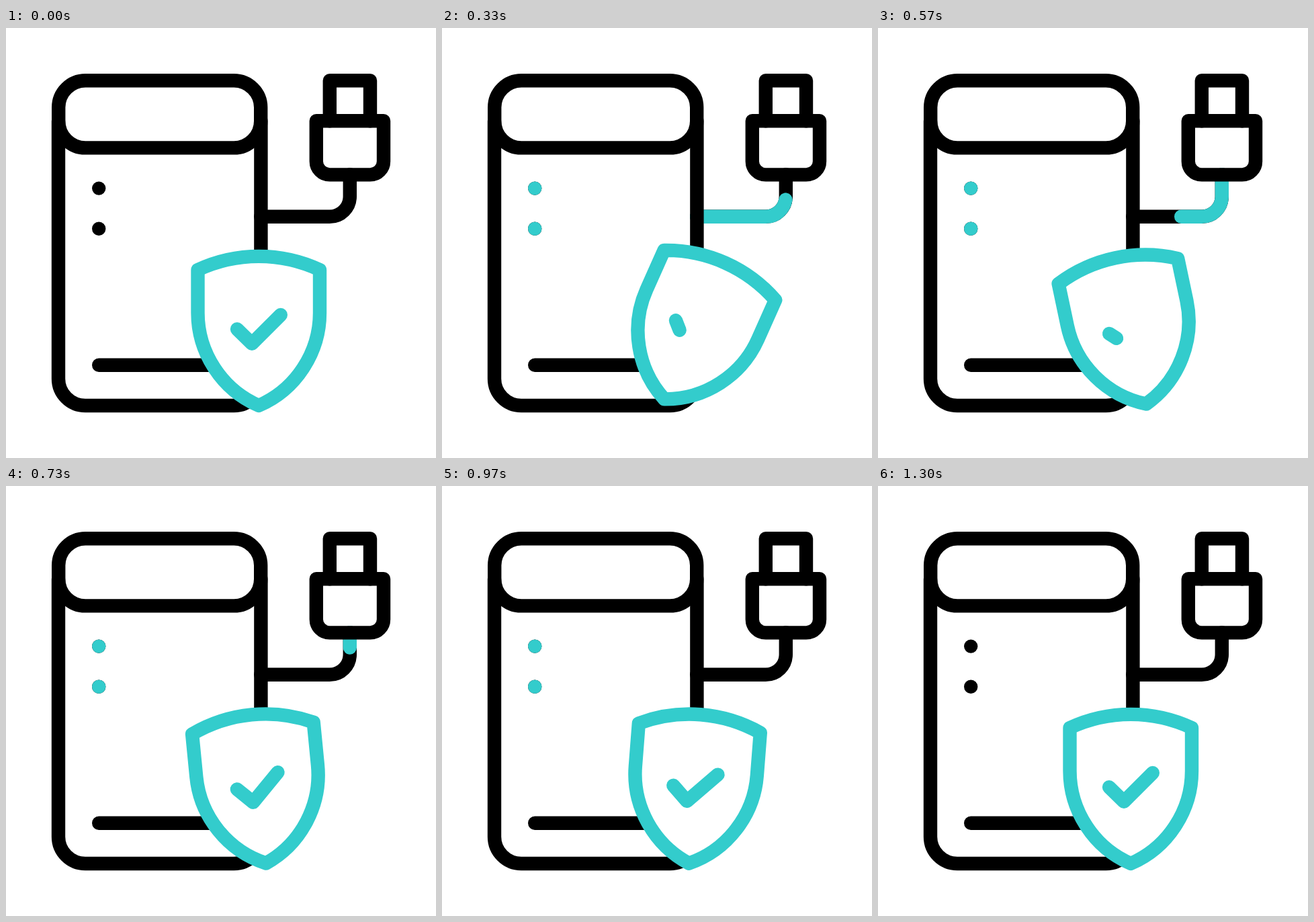
These frames come from a looping animation (640 by 640 pixels, 1670 ms). An HTML page:

```html
<!DOCTYPE html>
<html lang="en">
<head>
<meta charset="utf-8">
<title>Protected drive</title>
<style>
  html, body { margin: 0; width: 100%; height: 100%; overflow: hidden; background: #fff; }
  svg { display: block; width: 100vw; height: 100vh; }
  .line { fill: none; stroke: #000; stroke-width: 20.4; stroke-linecap: round; stroke-linejoin: round; }
  .cyan { stroke: #33cccc; }
</style>
</head>
<body>
<svg viewBox="0 0 640 640">
  <path class="line" d="M379.2 280.8H481.8A30 30 0 0 0 511.8 250.8V218.3"/>
  <path class="line cyan" id="pulse" pathLength="1" d="M379.2 280.8H481.8A30 30 0 0 0 511.8 250.8V218.3"/>

  <rect class="line" x="78.2" y="78.2" width="301" height="100.2" rx="40"/>
  <path class="line" d="M78 138.4V522A40 40 0 0 0 118 562H339.4A40 40 0 0 0 379.4 522V138.4"/>
  <path class="line" d="M138.2 501.8H318"/>

  <path class="line" d="M481.8 138.2V78.2H542V138.2"/>
  <path class="line" d="M461.8 138.2H562V198.4A20 20 0 0 1 542 218.4H481.8A20 20 0 0 1 461.8 198.4Z"/>

  <g>
    <circle cx="138.2" cy="238.6" r="10.2"/>
    <circle cx="138.2" cy="298.8" r="10.2"/>
  </g>
  <g id="lights" fill="#33cccc">
    <circle cx="138.2" cy="238.6" r="10.2"/>
    <circle cx="138.2" cy="298.8" r="10.2"/>
  </g>

  <g id="shield">
    <path class="line cyan" style="fill:#fff" d="M285.5 360C343 333.2 409.5 333.2 467 360V424C467 483 431.5 538 376.2 562C321 538 285.5 483 285.5 424Z"/>
    <path class="line cyan" id="tick" pathLength="1" d="M344 448.2L366 469.8L408.8 427"/>
  </g>
</svg>
<script>
  const LOOP = 1670, FPS = 30;
  const el = id => document.getElementById(id);
  const pulse = el('pulse'), lights = el('lights'), shield = el('shield'), tick = el('tick');

  // Eased 0..1 progress between two frame positions
  function ease(now, from, to) {
    const p = Math.min(1, Math.max(0, (now - from) / (to - from)));
    return p * p * (3 - 2 * p);
  }

  // [frame position, degrees]: a wobble that dies out
  const swing = [[0.8, 0], [11.2, 25], [18.4, -16], [26.3, 8], [33.8, -4], [39, 0]];

  function angle(now) {
    let a = 0;
    for (let i = 1; i < swing.length; i++) {
      a += (swing[i][1] - swing[i - 1][1]) * ease(now, swing[i - 1][0], swing[i][0]);
    }
    return a;
  }

  function trim(path, start, end) {
    const len = end - start;
    path.style.display = len > 0.001 ? '' : 'none';
    path.setAttribute('stroke-dasharray', `${len} 3`);
    path.setAttribute('stroke-dashoffset', -start);
  }

  function draw(ms) {
    const now = Math.floor((ms % LOOP + 3.4) * FPS / 1000);
    trim(pulse, ease(now, 10.9, 25.1), ease(now, 0, 14.1));
    trim(tick, 0, 1 - ease(now, 2.4, 12.7) + ease(now, 15.2, 22.8));
    shield.setAttribute('transform', `rotate(${angle(now)} 376.2 451)`);
    lights.setAttribute('opacity', ease(now, 5, 10) - ease(now, 32, 39));
  }

  const begin = performance.now();
  function loop() {
    draw(performance.now() - begin);
    requestAnimationFrame(loop);
  }
  loop();
</script>
</body>
</html>
```
